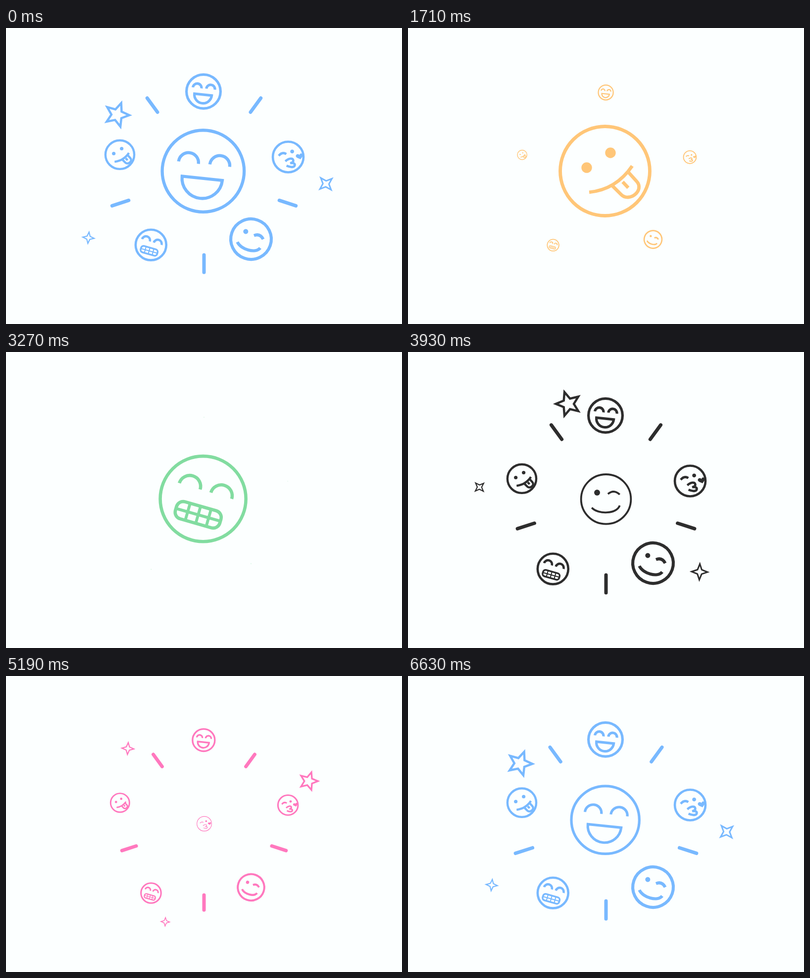
An HTML page with a canvas that plays this animation: 800 by 600 pixels, repeating every 6660 ms.

```html
<!DOCTYPE html>
<html lang="en">
<head>
<meta charset="utf-8">
<title>Emoji burst</title>
<style>
  html, body { margin: 0; width: 100%; height: 100%; overflow: hidden; background: #fcffff; }
  canvas { display: block; width: 800px; height: 600px; }
</style>
</head>
<body>
<canvas id="stage" width="800" height="600"></canvas>
<script>
const ctx = document.getElementById('stage').getContext('2d');
const LOOP = 6660, STEPS = 37, LEAD = 7;

const clamp = v => Math.min(1, Math.max(0, v));
const span = (p, a, b) => clamp((p - a) / (b - a));
const sine = u => (1 - Math.cos(Math.PI * u)) / 2;
const rad = deg => deg * Math.PI / 180;

// Faces are drawn in a unit circle; w is the line weight.
function stroke(d, w) {
  ctx.lineWidth = w;
  ctx.stroke(new Path2D(d));
}

function dot(x, y, r) {
  ctx.beginPath();
  ctx.arc(x, y, r, 0, 7);
  ctx.fill();
}

function lid(x, y, r, tilt, w) {
  ctx.lineWidth = w;
  ctx.beginPath();
  ctx.arc(x, y, r, Math.PI + rad(tilt), 2 * Math.PI + rad(tilt));
  ctx.stroke();
}

const faces = {
  laugh(w) {
    lid(-.345, -.2, .235, 7, w);
    lid(.39, -.13, .235, 7, w);
    ctx.lineWidth = w;
    ctx.beginPath();
    ctx.arc(-.023, .17, .475, rad(6), rad(186));
    ctx.closePath();
    ctx.stroke();
  },
  tongue(w) {
    dot(-.394, -.074, .114);
    dot(.117, -.394, .114);
    stroke('M-.34 .457Q.238 .4 .585 -.11', w);
    stroke('M.138 .298L.35 .51C.52 .68 .86 .42 .68 .22L.49 .01', w);
    stroke('M.38 .234L.5 .36', w);
  },
  grin(w, thin) {
    lid(-.3, -.283, .245, 17, w);
    lid(.41, -.07, .245, 17, w);
    ctx.save();
    ctx.translate(-.11, .36);
    ctx.rotate(rad(16));
    ctx.lineWidth = thin ? w * .75 : w;
    ctx.beginPath();
    ctx.roundRect(-.52, -.2, 1.04, .4, .155);
    ctx.stroke();
    stroke('M-.52 0H.52M-.245 -.2V.2M0 -.2V.2M.245 -.2V.2', thin ? w * .45 : w * .9);
    ctx.restore();
  },
  wink(w) {
    dot(-.344, -.254, .114);
    stroke('M.075 -.2Q.3 -.4 .53 -.18', w);
    stroke('M-.55 .33C-.3 .6 .42 .58 .53 .245', w);
  },
  kiss(w) {
    dot(.243, -.335, .114);
    stroke('M-.57 -.075Q-.36 -.34 -.11 -.18', w);
    stroke('M-.17 .26C.05 .06 .28 .05 .31 .2C.33 .33 .22 .35 .12 .38C.3 .33 .43 .4 .4 .51C.37 .64 .15 .64 -.1 .53', w);
    ctx.fill(new Path2D('M.69 -.11C.7 -.27 .9 -.24 .89 -.09C.88 0 .8 .05 .75 .14C.65 .08 .5 .06 .47 -.03C.44 -.17 .63 -.22 .69 -.11Z'));
  }
};

function drawFace(name, x, y, r, w, turn = 0, thin = false) {
  if (r < .3) return;
  ctx.save();
  ctx.translate(x, y);
  ctx.scale(r, r);
  ctx.rotate(rad(turn));
  ctx.lineWidth = w;
  ctx.beginPath();
  ctx.arc(0, 0, 1 - w / 2, 0, 7);
  ctx.stroke();
  faces[name](w, thin);
  ctx.restore();
}

// Stars: x and y from the centre, kind, turn.
const kinds = {
  big: { tips: 5, r: 25, inner: .45, w: 4.5 },
  mid: { tips: 4, r: 16, inner: .38, w: 3 },
  small: { tips: 4, r: 11.5, inner: .38, w: 2.2 }
};

const scenes = [
  { color: '#78b9ff', face: 'laugh', dx: -1.8, dy: -11, r: 95,
    stars: [[-177, -125, 'big', 2], [-235, 126, 'small', 6], [248, 16, 'mid', 49]] },
  { color: '#ffc678', face: 'tongue', dx: -2, dy: -10, r: 94,
    stars: [[222, -96, 'big', 0], [-248, -106, 'small', 5], [170, 170, 'mid', 47]] },
  { color: '#82dca0', face: 'grin', dx: -2, dy: -2.5, r: 95.5,
    stars: [[40, 250, 'big', 90], [110, -211, 'small', 3], [-205, 190, 'mid', 4]] },
  { color: '#2d2d2d', face: 'wink', dx: 0, dy: -3, r: 94.6,
    stars: [[-79, -202, 'big', 180], [-265, -27, 'small', 47], [196, 151, 'mid', 2]] },
  { color: '#ff78be', face: 'kiss', dx: 3.5, dy: -3, r: 93.2,
    stars: [[243, -100, 'big', 0], [-90, 228, 'small', 3], [-177, -176, 'mid', 4]] }
];

const satellites = [
  { face: 'laugh', x: 400, y: 132.3, dx: -1, dy: -3.6, r: 37, from: 3.2, to: 20 },
  { face: 'kiss', x: 569, y: 262, dx: 1, dy: -.5, r: 33.3, from: 2.8, to: 20 },
  { face: 'wink', x: 495, y: 429, dx: 0, dy: -1, r: 44, from: 3.2, to: 20, turn: 19 },
  { face: 'grin', x: 293.3, y: 440.5, dx: -.5, dy: -.8, r: 33.3, from: 1.6, to: 20.5 },
  { face: 'tongue', x: 231, y: 257.3, dx: -1, dy: -.5, r: 31.3, from: 3.2, to: 18 }
];

function drawRays(p) {
  const inner = 160 + 4 * p;
  const outer = 132 + 68 * (1 - (1 - span(p, -7, 10)) ** 5);
  const len = outer - inner;
  if (len <= 0) return;
  ctx.lineCap = 'round';
  ctx.lineWidth = 7 * clamp(len / 8);
  ctx.beginPath();
  for (let i = 0; i < 5; i++) {
    const a = rad(90 + 72 * i), c = Math.cos(a), s = Math.sin(a);
    ctx.moveTo(400 + c * inner, 300 + s * inner);
    ctx.lineTo(400 + c * outer, 300 + s * outer);
  }
  ctx.stroke();
  ctx.lineCap = 'butt';
}

function drawStars(stars, p) {
  const u = p + LEAD;
  const reach = (1 - Math.exp(-u / 1.4)) * (1 + .0038 * p);
  const size = clamp(u / 4);
  ctx.globalAlpha = clamp((11 - p) / 2.2);
  if (!size || !ctx.globalAlpha) { ctx.globalAlpha = 1; return; }
  for (const [x, y, kind, turn] of stars) {
    const k = kinds[kind];
    ctx.save();
    ctx.translate(400 + x * reach, 300 + y * reach);
    ctx.rotate(rad(turn));
    ctx.scale(size, size);
    ctx.lineWidth = k.w;
    ctx.beginPath();
    for (let i = 0; i < k.tips * 2; i++) {
      const a = Math.PI * i / k.tips, r = i % 2 ? k.r * k.inner : k.r;
      ctx.lineTo(Math.cos(a) * r, Math.sin(a) * r);
    }
    ctx.closePath();
    ctx.stroke();
    ctx.restore();
  }
  ctx.globalAlpha = 1;
}

function drawSatellites(p) {
  for (const s of satellites) {
    const grow = sine(span(p, -7, -2));
    const shrink = (1 - span(p, s.from, s.to) ** 2) ** 3.4;
    const k = grow * shrink;
    drawFace(s.face, s.x + s.dx * k, s.y + s.dy * k, s.r * k, .14, s.turn, true);
  }
}

// Five steps per 180 ms, the fourth one held twice as long.
function stepAt(ms) {
  const slot = Math.floor(ms % 180 / 30);
  return Math.floor(ms / 180) * 5 + (slot > 3 ? slot - 1 : slot);
}

function draw(ms) {
  const q = (stepAt(ms) + LEAD) % (STEPS * scenes.length);
  const scene = scenes[Math.floor(q / STEPS)];
  const p = q % STEPS - LEAD;
  ctx.fillStyle = '#fcffff';
  ctx.fillRect(0, 0, 800, 600);
  ctx.fillStyle = ctx.strokeStyle = scene.color;
  drawRays(p);
  drawStars(scene.stars, p);
  drawSatellites(p);
  const k = sine(span(p, -6, 1.5)) * (1 - span(p, 9, 29.5) ** 3);
  drawFace(scene.face, 400 + scene.dx * k, 300 + scene.dy * k, scene.r * k, .073);
}

const start = performance.now();
function tick() {
  draw((performance.now() - start) % LOOP);
  requestAnimationFrame(tick);
}
tick();
</script>
</body>
</html>
```
